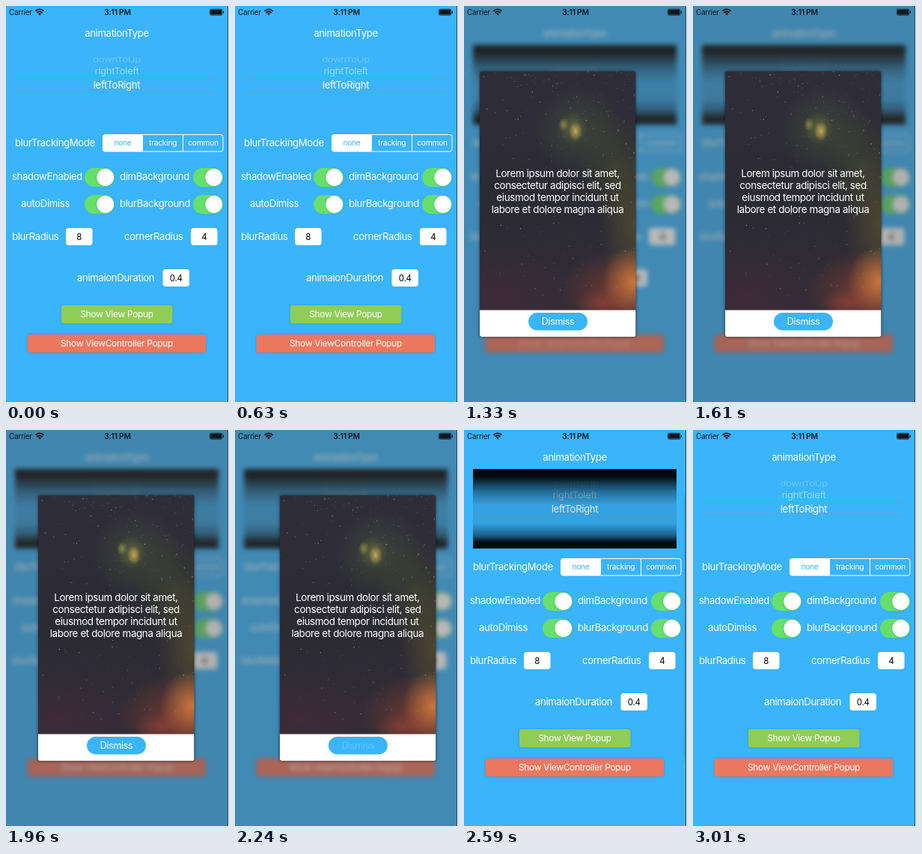
Recreate the animation shown at these times as an HTML page. Size 298 px wide and 528 px high, loop 3.08 s.

```html
<!DOCTYPE html>
<html lang="en">
<head>
<meta charset="utf-8">
<title>Popup demo</title>
<style>
  html, body { margin: 0; width: 100%; height: 100%; overflow: hidden; background: #3ab4fb; }
  svg { display: block; width: 298px; height: 528px; }
  text { font-family: Inter, "Liberation Sans", sans-serif; letter-spacing: -.028em; }
  #popup { filter: drop-shadow(0 0 2px rgba(0, 0, 0, .6)); }
  .raised { filter: drop-shadow(0 .5px 1.5px rgba(0, 0, 0, .18)); }
</style>
</head>
<body>
<svg viewBox="0 0 298 528">
  <defs>
    <linearGradient id="wheel" x2="0" y2="1">
      <stop offset="0" stop-opacity=".98"/>
      <stop offset=".1" stop-opacity=".92"/>
      <stop offset=".28" stop-opacity=".4"/>
      <stop offset=".45" stop-opacity=".1"/>
      <stop offset=".68" stop-opacity=".1"/>
      <stop offset=".83" stop-opacity=".45"/>
      <stop offset=".92" stop-opacity=".92"/>
      <stop offset="1" stop-opacity=".98"/>
    </linearGradient>
    <linearGradient id="sky" x2="0" y2="1">
      <stop offset="0" stop-color="#302d3a"/>
      <stop offset=".5" stop-color="#2b2b34"/>
      <stop offset="1" stop-color="#342c37"/>
    </linearGradient>
    <clipPath id="card"><rect y="87" width="208.5" height="354" rx="3"/></clipPath>
  </defs>
  <rect width="298" height="528" fill="#3ab4fb"/>
  <g id="ui"></g>
  <rect id="dim" width="298" height="528" fill="#4b4b4b"/>
  <g id="popup"><g id="content" clip-path="url(#card)"></g></g>
  <g id="status"></g>
</svg>
<script>
const LOOP = 3080, SHOW = 1215, HIDE = 2173, HIDE_TIME = 433;
const REST_X = 43, CARD_W = 208.5, STAGE_W = 298;
const $ = id => document.getElementById(id);
const clamp = v => Math.max(0, Math.min(1, v));

const text = (s, x, y, { size = 13.2, weight = 400, anchor = 'start', fill = '#fff', extra = '' } = {}) =>
  `<text x="${x}" y="${y}" font-size="${size}" font-weight="${weight}" text-anchor="${anchor}" fill="${fill}" ${extra}>${s}</text>`;
const centered = (s, x, y, opts) => text(s, x, y, { anchor: 'middle', ...opts });
const box = (x, y, w, h, r, fill, extra = '') =>
  `<rect x="${x}" y="${y}" width="${w}" height="${h}" rx="${r}" fill="${fill}" ${extra}/>`;
const toggle = (x, y) => box(x, y, 40, 25, 12.5, '#66e06a') +
  `<circle class="raised" cx="${x + 27.7}" cy="${y + 12.5}" r="11.4" fill="#fff"/>`;
const field = (s, x, y) => box(x, y, 35.5, 23, 4, '#fff') +
  centered(s, x + 17.7, y + 15.7, { size: 11.5, fill: '#000' });
const button = (s, x, y, w, fill, id) => box(x, y, w, 24, 3, fill, 'class="raised"') +
  centered(s, 148, y + 16.2, { size: 12, extra: `id="${id}"` });
const rule = y => `<path d="M12 ${y}H284" stroke="#64a4c4" stroke-width=".8"/>`;

$('ui').innerHTML =
  centered('animationType', 148, 41) +
  centered('downToUp', 0, 0, { extra: 'opacity=".25" transform="translate(148 74.5) scale(1 .7)"' }) +
  centered('rightToleft', 0, 0, { extra: 'opacity=".5" transform="translate(148 91.3) scale(1 .9)"' }) +
  centered('leftToRight', 148, 110) +
  rule(95.5) + rule(116.5) +
  box(12, 52, 272, 106, 0, 'url(#wheel)', 'id="shade"') +
  text('blurTrackingMode', 12, 187) +
  box(129.5, 171.5, 160.5, 22.5, 3, 'none', 'stroke="#fff"') +
  box(129.5, 171.5, 53.5, 22.5, 2, '#fff') +
  '<path d="M236.5 171.5v22.5" stroke="#fff"/>' +
  [['none', 156, '#3ab4fb'], ['tracking', 209.7, '#fff'], ['common', 263.5, '#fff']]
    .map(([s, x, fill]) => centered(s, x, 186, { size: 10.3, fill })).join('') +
  text('shadowEnabled', 8, 232) + toggle(105, 216) +
  text('dimBackground', 152, 232) + toggle(250, 216) +
  text('autoDimiss', 20, 268) + toggle(105, 252) +
  text('blurBackground', 152, 268) + toggle(250, 252) +
  text('blurRadius', 8, 312) + field('8', 80, 296) +
  text('cornerRadius', 158, 312) + field('4', 247, 296) +
  text('animaionDuration', 95, 367) + field('0.4', 209.5, 351) +
  button('Show View Popup', 74, 399, 148.5, '#90cd56', 'showView') +
  button('Show ViewController Popup', 28.5, 438, 238.5, '#ec775f', 'showController');

// Night sky: soft glows with seeded stars
let seed = 11;
const random = () => (seed = seed * 16807 % 2147483647) / 2147483647;
const glow = (x, y, rx, ry, color, alpha, i) =>
  `<radialGradient id="glow${i}"><stop stop-color="${color}" stop-opacity="${alpha}"/>` +
  `<stop offset="1" stop-color="${color}" stop-opacity="0"/></radialGradient>` +
  `<ellipse cx="${x}" cy="${y}" rx="${rx}" ry="${ry}" fill="url(#glow${i})"/>`;
const glows = [
  [132, 165, 62, 60, '#465438', .6],
  [180, 215, 50, 75, '#48502f', .55],
  [205, 290, 45, 100, '#5a5030', .7],
  [30, 385, 100, 60, '#4c2c38', .5],
  [185, 380, 80, 55, '#7c3c30', .8],
  [205, 368, 42, 48, '#dc803e', .85],
  [165, 396, 38, 20, '#a84a38', .5],
  [112, 158, 7, 9, '#a8a452', .7],
  [124, 163, 20, 22, '#7c8444', .5],
  [128, 167, 9, 13, '#dcb65c', .8]
].map((g, i) => glow(...g, i)).join('');
let stars = '';
for (let i = 0; i < 320; i++) {
  const x = CARD_W * random() ** .75, y = 87 + 300 * random() ** 1.6;
  stars += `<circle cx="${x.toFixed(1)}" cy="${y.toFixed(1)}" r="${(.25 + .4 * random()).toFixed(2)}" ` +
    `fill="#e6e4d2" opacity="${(.15 + .6 * random()).toFixed(2)}"/>`;
}
const lines = ['Lorem ipsum dolor sit amet,', 'consectetur adipisci elit, sed',
  'eiusmod tempor incidunt ut', 'labore et dolore magna aliqua'];
$('content').innerHTML =
  box(0, 87, CARD_W, 354, 0, 'url(#sky)') + glows + stars +
  lines.map((s, i) => centered(s, 104, 227.5 + 16 * i, { size: 13.4 })).join('') +
  box(0, 405.5, CARD_W, 36, 0, '#fff') +
  box(65, 409, 79, 23.5, 11.75, '#3ab4fb') +
  centered('Dismiss', 104.5, 425, { size: 12.5, extra: 'id="dismiss"' });

$('status').innerHTML =
  text('Carrier', 4, 11.7, { size: 10, fill: '#101820' }) +
  '<path d="M39.4 6.8a7.9 7.9 0 0 1 11.2 0M41.4 9a5.1 5.1 0 0 1 7.2 0" fill="none" stroke="#101820" stroke-width="1.8"/>' +
  '<path d="M45 12.6l-2-2.1a2.8 2.8 0 0 1 4 0z" fill="#101820"/>' +
  centered('3:11 PM', 149, 11.7, { size: 10.3, weight: 600, fill: '#101820' }) +
  box(272.4, 4.2, 16.6, 8, 2, 'none', 'stroke="#101820" stroke-width=".8"') +
  box(273.2, 5, 15, 6.4, 1, '#101820') +
  box(289.8, 6.7, 1.2, 3, .5, '#101820') +
  box(296, 0, 1, 528, 0, '#1c4a68') +
  box(297, 0, 1, 528, 0, '#e4ecf0');

// Title dims at once on press, then fades back after release
const pressed = (t, down, up, fade, low) =>
  t < down ? 1 : low + (1 - low) * clamp((t - up) / fade);

function draw(t) {
  const wt = Math.max(0, t - SHOW) * .035;
  const shown = 1 - (1 + wt) * Math.exp(-wt);
  const u = clamp((t - HIDE) / HIDE_TIME);
  const gone = u * u * (3 - 2 * u);
  const active = t > SHOW && u < 1;
  const level = active ? shown * (1 - gone) : 0;
  const x = -CARD_W + (REST_X + CARD_W) * shown + (STAGE_W - REST_X) * gone;

  $('ui').style.filter = active ? `blur(${(3.4 * level).toFixed(2)}px)` : 'none';
  $('shade').setAttribute('visibility', active ? 'visible' : 'hidden');
  $('dim').setAttribute('opacity', .43 * level);
  $('popup').setAttribute('visibility', active ? 'visible' : 'hidden');
  $('popup').setAttribute('transform', `translate(${x.toFixed(2)} 0)`);
  $('showController').setAttribute('opacity', pressed(t, 1120, 1220, 500, .25));
  $('dismiss').setAttribute('opacity', pressed(t, 2100, 2250, 230, .2));
}

const start = performance.now();
(function tick() {
  draw((performance.now() - start) % LOOP);
  requestAnimationFrame(tick);
})();
</script>
</body>
</html>
```
